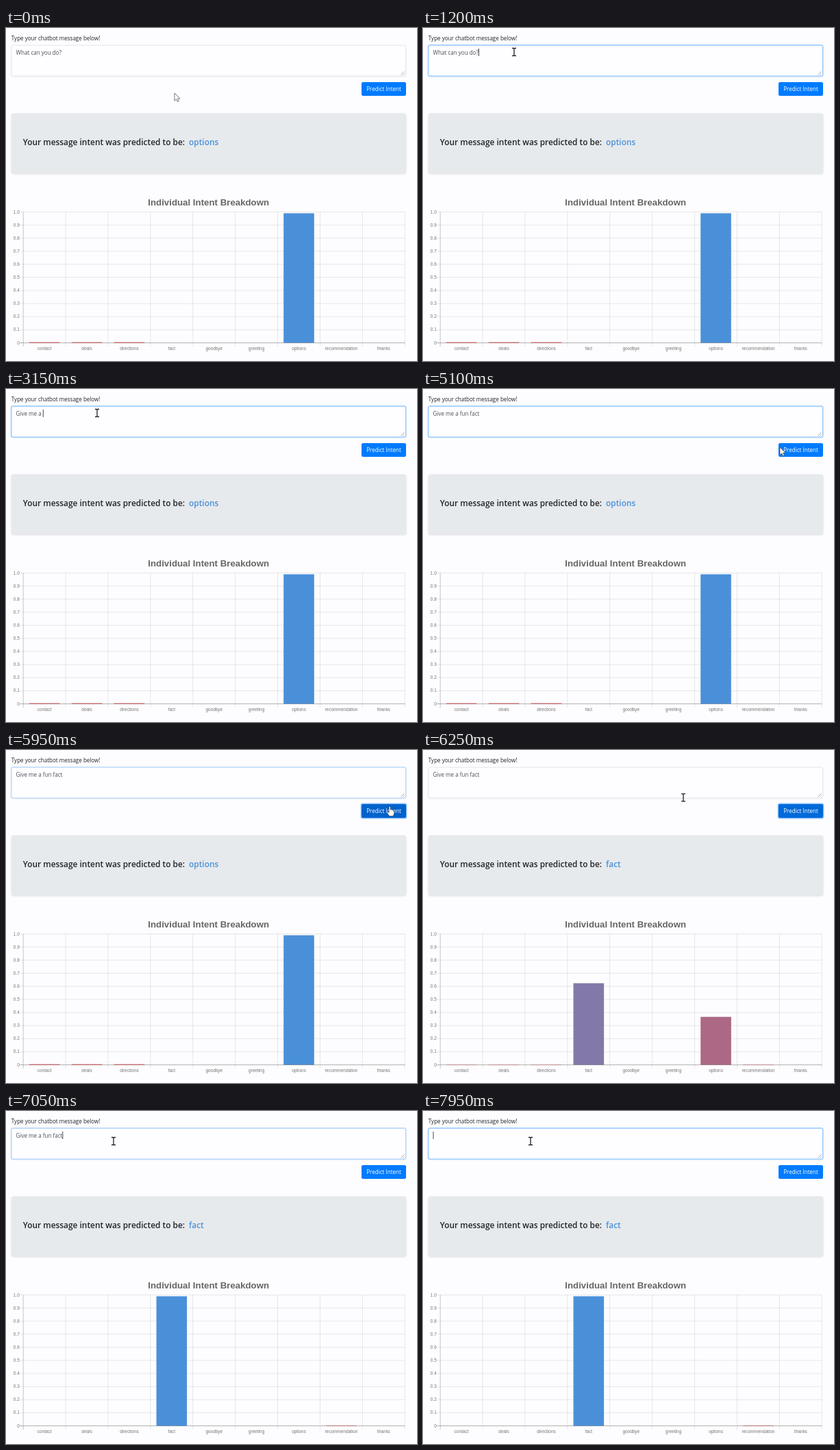
These frames come from a looping animation (600x486 px, 8000 ms). An HTML page:

```html
<!DOCTYPE html>
<html lang="en">
<head>
<meta charset="utf-8">
<title>Intent prediction</title>
<style>
  html, body { margin: 0; width: 100%; height: 100%; overflow: hidden; background: #fdfcfe; }
  svg { display: block; width: 600px; height: 486px; }
  text { white-space: pre; }
  .ui { font: 8.05px "Open Sans", "Noto Sans", sans-serif; }
  .heading { font: 600 11.9px "Open Sans", "Noto Sans", sans-serif; }
  .title { font: bold 13.27px "Liberation Sans", Arial, sans-serif; fill: #666; }
  .axis { font: 6.45px "Liberation Sans", Arial, sans-serif; fill: #777; }
</style>
</head>
<body>
<svg viewBox="0 0 600 486">
  <defs>
    <filter id="soft" x="-5%" y="-20%" width="110%" height="150%"><feGaussianBlur stdDeviation="1.6"/></filter>
  </defs>

  <text class="ui" x="7.8" y="18" fill="#212529">Type your chatbot message below!</text>

  <rect x="8" y="26" width="576" height="45" rx="2.5" fill="#000" opacity=".08" filter="url(#soft)"/>
  <rect id="glow" x="6.7" y="24" width="578" height="47.3" rx="3.5" fill="#b9dcff"/>
  <rect id="field" x="8" y="25.3" width="575.5" height="44.7" rx="2.3" fill="#fefdff"/>
  <path d="M576.5 68.5l5-5M579.5 68.5l2-2" stroke="#888" stroke-width=".7"/>
  <text id="message" class="ui" x="14.6" y="38.6" fill="#495057"></text>
  <rect id="caret" y="30" width=".9" height="11" fill="#333"/>

  <rect id="ring" x="517.6" y="77.6" width="67.8" height="22.8" rx="3.4" fill="#8fc4ff"/>
  <rect id="button" x="519" y="79" width="65" height="20" rx="2.2"/>
  <text class="ui" x="551.5" y="92.2" text-anchor="middle" fill="#fff">Predict Intent</text>

  <rect x="8" y="126" width="576" height="87" rx="3" fill="#000" opacity=".13" filter="url(#soft)"/>
  <rect x="8" y="124.5" width="576" height="87.5" rx="2.5" fill="#e7eaed"/>
  <text class="heading" x="24.8" y="171.2" fill="#212529">Your message intent was predicted to be:</text>
  <text id="intent" class="heading" x="267" y="171.2" fill="#4a90d9"></text>

  <text class="title" x="295.7" y="258.8" text-anchor="middle">Individual Intent Breakdown</text>
  <g id="grid"></g>
  <g id="bars"></g>
  <path d="M20 459.5H582.5M25.2 268.5V465" stroke="#000" stroke-opacity=".22"/>

  <g id="arrow"><path d="M0 0V11.3L2.7 8.9L4.4 12.6L6.3 11.8L4.6 8.1H8Z" fill="#fff" stroke="#555" stroke-width=".8" stroke-linejoin="round"/></g>
  <g id="beam"><path d="M-3-5.5H-1Q0-5.5 0-4.5Q0-5.5 1-5.5H3M-3 5.5H-1Q0 5.5 0 4.5Q0 5.5 1 5.5H3M0-5V5" fill="none" stroke="#222" stroke-width="1.3"/></g>
  <g id="hand"><path d="M-1 1Q0-.6 1.2 1V5.2Q2.6 4.4 3.2 5.6Q4.6 5 5 6.2Q6.6 5.8 6.6 7.6V10.6Q6.4 13 5 14.4H-.4Q-2 12-3.8 9.4Q-4 7.6-2.4 8.2L-1 9.6Z" fill="#fff" stroke="#333" stroke-width=".7" stroke-linejoin="round"/></g>
</svg>

<script>
const LOOP = 8000, BLINK = 530;
const FOCUS = 900, CLEAR = 1450, CLICK = 5880, PREDICT = 6030, REFOCUS = 6950, RECLEAR = 7600;
const PHRASE = "Give me a fun fact";
const KEYS = [2000, 2150, 2250, 2350, 2500, 2600, 2700, 2800, 3000, 3150,
              3400, 3450, 3550, 3700, 3800, 3900, 4000, 4150];
// Pointer stops: time, x, y
const STOPS = [[0, 246, 95], [50, 246, 95], [850, 133, 35], [4650, 133, 35], [5100, 521, 85],
               [5400, 560, 82], [6030, 560, 82], [6500, 162, 54], [6900, 157, 44], [LOOP, 157, 44]];
const LABELS = ["contact", "deals", "directions", "fact", "goodbye", "greeting", "options", "recommendation", "thanks"];
const BEFORE = [.005, .005, .005, 0, 0, 0, .99, 0, 0];
const AFTER = [0, 0, 0, .99, 0, 0, 0, .003, 0];
const BLUE = [74, 144, 217], RED = [229, 81, 84];
const LEFT = 25.2, COLUMN = 61.9, BASE = 459.5, HEIGHT = 191, BAR = 44.6;

const $ = id => document.getElementById(id);
const clamp = x => Math.max(0, Math.min(1, x));
const mix = (a, b, k) => a + (b - a) * k;
const smooth = x => x * x * (3 - 2 * x);
const mixColor = (a, b, k) => `rgb(${a.map((v, i) => Math.round(mix(v, b[i], k)))})`;
const show = (id, visible) => $(id).setAttribute("visibility", visible ? "visible" : "hidden");

function add(parent, tag, attributes, content = "") {
  const node = document.createElementNS("http://www.w3.org/2000/svg", tag);
  for (const name in attributes) node.setAttribute(name, attributes[name]);
  node.textContent = content;
  return parent.appendChild(node);
}

function buildGrid() {
  const line = d => add($("grid"), "path", { d, stroke: "#000", "stroke-opacity": .09 });
  for (let i = 0; i <= 10; i++) {
    const y = BASE - i * HEIGHT / 10;
    line(`M20 ${y}H582.5`);
    add($("grid"), "text", { class: "axis", x: 19.8, y: y + 2, "text-anchor": "end" },
      i ? (i / 10).toFixed(1) : "0");
  }
  for (let i = 1; i <= 9; i++) line(`M${LEFT + i * COLUMN} 268.5V465`);
  LABELS.forEach((label, i) => add($("grid"), "text",
    { class: "axis", x: LEFT + (i + .5) * COLUMN, y: 470.2, "text-anchor": "middle" }, label));
}

buildGrid();
const bars = LABELS.map((_, i) => add($("bars"), "rect",
  { x: LEFT + (i + .5) * COLUMN - BAR / 2, width: BAR }));

function drawChart(t) {
  const k = 1 - (1 - clamp((t - PREDICT) / 1000)) ** 4;
  bars.forEach((bar, i) => {
    const height = HEIGHT * mix(BEFORE[i], AFTER[i], k);
    bar.setAttribute("y", BASE - height);
    bar.setAttribute("height", height);
    const from = BEFORE[i] > .5 ? BLUE : RED, to = AFTER[i] > .5 ? BLUE : RED;
    bar.setAttribute("fill", mixColor(from, to, k));
  });
  $("intent").textContent = t < PREDICT ? "options" : "fact";
}

function drawField(t) {
  const typed = KEYS.filter(key => key <= t).length;
  $("message").textContent = t < CLEAR ? "What can you do?" : t < RECLEAR ? PHRASE.slice(0, typed) : "";

  const focused = (t >= FOCUS && t < CLICK) || t >= REFOCUS;
  const lastInput = Math.max(...[FOCUS, CLEAR, ...KEYS, REFOCUS, RECLEAR].filter(time => time <= t));
  show("caret", focused && Math.floor((t - lastInput) / BLINK) % 2 === 0);
  $("caret").setAttribute("x", 14.6 + $("message").getComputedTextLength());

  const fade = start => clamp((t - start) / 150);
  const glow = fade(FOCUS) - fade(CLICK) + fade(REFOCUS);
  $("glow").setAttribute("opacity", glow);
  $("field").setAttribute("stroke", mixColor([226, 228, 232], [128, 189, 255], glow));
  $("field").setAttribute("stroke-width", .8);
}

function drawPointer(t) {
  const n = STOPS.findIndex(stop => stop[0] > t);
  const [t0, x0, y0] = STOPS[n - 1], [t1, x1, y1] = STOPS[n];
  const k = smooth((t - t0) / (t1 - t0));
  const x = mix(x0, x1, k), y = mix(y0, y1, k);
  const overButton = x > 522 && x < 584 && y > 79 && y < 99;
  const overField = x > 8 && x < 584 && y > 25 && y < 70;
  const kind = overButton ? "hand" : overField ? "beam" : "arrow";
  for (const id of ["hand", "beam", "arrow"]) show(id, id === kind);
  $(kind).setAttribute("transform", `translate(${x} ${y})`);

  const focused = t >= CLICK && t < REFOCUS;
  show("ring", focused);
  const pressed = focused && t < PREDICT;
  $("button").setAttribute("fill", pressed ? "#0062cc" : overButton || focused ? "#0069d9" : "#007bff");
}

let start;
function frame(now) {
  start ??= now;
  const t = (now - start) % LOOP;
  drawChart(t);
  drawField(t);
  drawPointer(t);
  requestAnimationFrame(frame);
}
requestAnimationFrame(frame);
</script>
</body>
</html>
```
